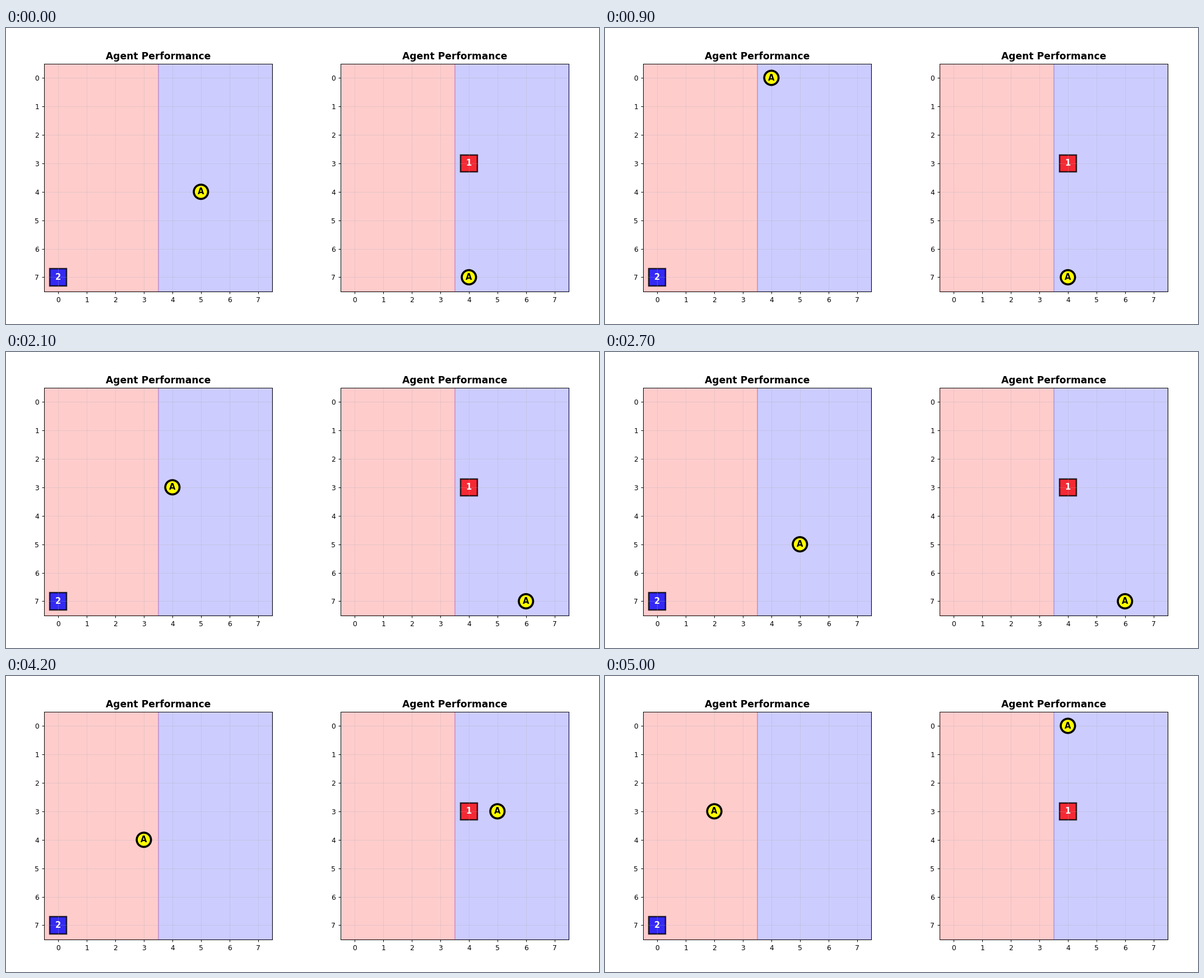
A matplotlib script that plays this animation: 1058 by 529 pixels, repeating every 5.1 s.

```python
import matplotlib.pyplot as plt
from matplotlib.animation import FuncAnimation
from matplotlib.patches import Circle, Rectangle

WIDTH, HEIGHT = 1058, 529
CELLS = 8
SIDE = 0.77 * HEIGHT
LEFT, TOP = 67.75, 63.6
BORDER = 3.51
STEPS = {"U": (0, -1), "D": (0, 1), "L": (-1, 0), "R": (1, 0), ".": (0, 0)}

plt.rcParams["font.family"] = "DejaVu Sans"


def walk(start, moves):
    """Cells visited from start, one per move."""
    path = [start]
    for move in moves:
        (x, y), (dx, dy) = path[-1], STEPS[move]
        path.append((x + dx, y + dy))
    return path


class Panel:
    def __init__(self, fig, offset, goal, label, color, path):
        self.path = path
        ax = fig.add_axes([(offset + LEFT) / WIDTH, 1 - (TOP + SIDE) / HEIGHT,
                           SIDE / WIDTH, SIDE / HEIGHT])
        ax.axvspan(-0.5, BORDER, color="red", alpha=0.2, snap=False)
        ax.axvspan(BORDER, CELLS - 0.5, color="blue", alpha=0.2, snap=False)
        ax.set_xlim(-0.5, CELLS - 0.5)
        ax.set_ylim(CELLS - 0.5, -0.5)
        ax.set_xticks(range(CELLS))
        ax.set_yticks(range(CELLS))
        ax.grid(True, alpha=0.3)
        ax.set_title("Agent Performance", fontsize=14, fontweight="bold")

        gx, gy = goal
        ax.add_patch(Rectangle((gx - 0.3, gy - 0.3), 0.6, 0.6, facecolor=color,
                               edgecolor="black", linewidth=2, alpha=0.8))
        self.write(ax, goal, label, "white", 3)

        self.agent = Circle(path[0], 0.25, facecolor="yellow",
                            edgecolor="black", linewidth=3, zorder=10)
        ax.add_patch(self.agent)
        self.letter = self.write(ax, path[0], "A", "black", 11)

    @staticmethod
    def write(ax, cell, text, color, zorder):
        return ax.text(*cell, text, color=color, fontsize=12, zorder=zorder,
                       fontweight="bold", ha="center", va="center")

    def show(self, step):
        self.agent.center = self.path[step]
        self.letter.set_position(self.path[step])
        return self.agent, self.letter


left_path = walk((5, 4), "URUU.LU.L.L.LD.R.DDR.D..RD."
                         "D.D.R.U.LUL.UL.L.ULL.RR")
right_path = walk((4, 7), "RRRLL..L.U.R.LRRR.D.L.RU.DL"
                          ".L.U.L.UUR.RU.LRRUUULLL")

fig = plt.figure(figsize=(12, 6), dpi=HEIGHT / 6, facecolor="white")
panels = [
    Panel(fig, 0, (0, 7), "2", "blue", left_path),
    Panel(fig, WIDTH / 2, (4, 3), "1", "red", right_path),
]


def update(step):
    return [artist for panel in panels for artist in panel.show(step)]


animation = FuncAnimation(fig, update, frames=len(left_path), interval=100,
                          repeat=True, repeat_delay=0, blit=False)
plt.show()
```
